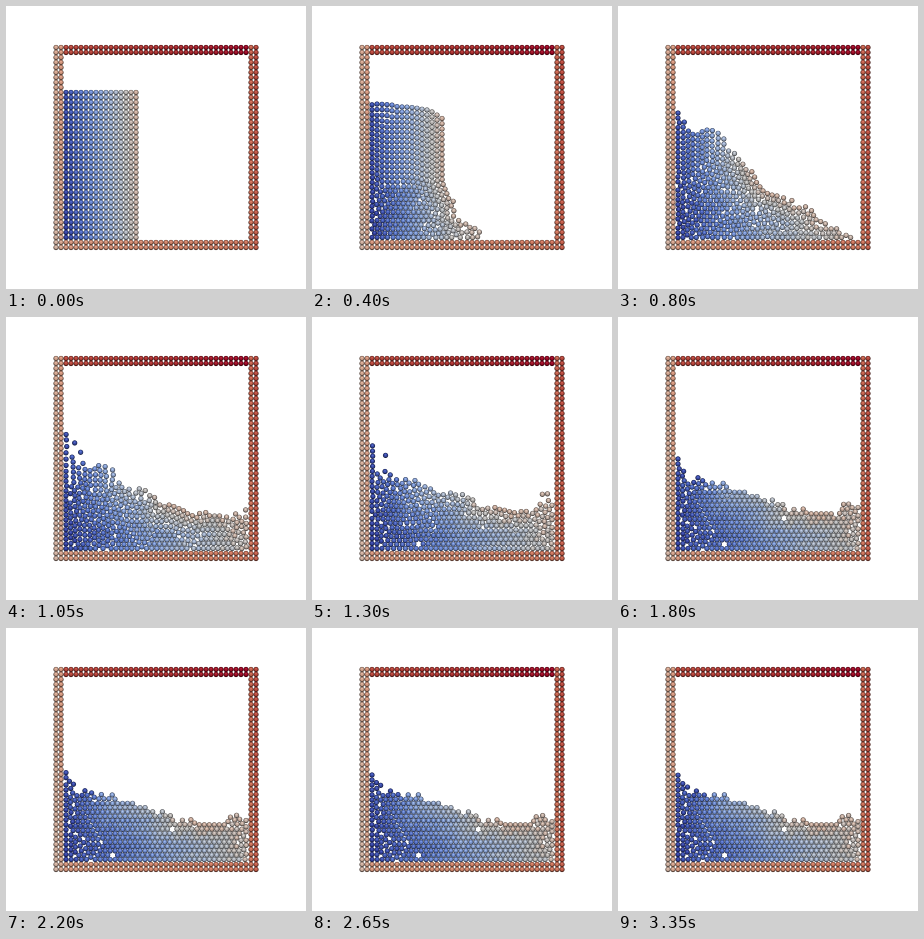
These frames come from a looping animation (300x283 px, 3400 ms). A matplotlib script:

```python
import numpy as np
import matplotlib.pyplot as plt
from matplotlib.animation import FuncAnimation
from matplotlib.collections import EllipseCollection

WIDTH, HEIGHT, DPI = 300, 283, 100
FRAMES, INTERVAL = 68, 50
D = 5.0
R = D / 2
SIDE = 41                       # spheres along one wall
X0, Y0 = 50.0, 41.5             # centre of the top left wall sphere
LEFT, RIGHT = X0 + 1.5 * D, X0 + (SIDE - 2.5) * D
FLOOR = Y0 + (SIDE - 2.5) * D
COLS, ROWS = 15, 30

# contact model, in pixels and frames
SUBSTEPS = 50
DT = 1 / SUBSTEPS
GRAVITY, STIFFNESS, DAMPING = 1.15, 300.0, 7.0
SHEAR, FRICTION = 3.0, 0.08


def block(cols, rows):
    """Centres of lattice cells, column by column, bottom to top."""
    return [(X0 + D * c, Y0 + D * r) for c in cols for r in reversed(rows)]


def heap_shift(x, frame):
    """Sideways drift towards a wedge that flattens as its reach grows."""
    reach = max(COLS * D, 360 * (1 - np.exp(-(frame / 20) ** 2)))
    grid = np.linspace(LEFT, RIGHT, 200)
    mass = np.cumsum(np.maximum(0, 1 - (grid - LEFT) / reach))
    q = np.linspace(0.01, 0.985, 24)
    have = np.quantile(x, q)
    want = np.interp(q, mass / mass[-1], grid)
    return np.interp(x, have, want - have)


def near_pairs(pos):
    gap = pos[:, None] - pos
    return np.nonzero(np.triu((gap ** 2).sum(axis=2) < (D + 3) ** 2, 1))


def accelerations(pos, vel, first, second):
    acc = np.zeros_like(pos)
    acc[:, 1] = GRAVITY

    rel = pos[first] - pos[second]
    dist = np.hypot(rel[:, 0], rel[:, 1])
    touch = dist < D
    a, b = first[touch], second[touch]
    dist = np.maximum(dist[touch], 1e-6)
    normal = rel[touch] / dist[:, None]
    dv = vel[a] - vel[b]
    vn = (dv * normal).sum(axis=1)
    push = np.maximum(STIFFNESS * (D - dist) - DAMPING * vn, 0)
    slip = dv - vn[:, None] * normal
    speed = np.hypot(slip[:, 0], slip[:, 1]) + 1e-9
    grip = np.minimum(SHEAR * speed, FRICTION * push) / speed
    force = push[:, None] * normal - grip[:, None] * slip
    for k in (0, 1):
        acc[:, k] += np.bincount(a, force[:, k], len(pos))
        acc[:, k] -= np.bincount(b, force[:, k], len(pos))

    for axis, sign, edge in ((0, 1, LEFT), (0, -1, RIGHT), (1, -1, FLOOR)):
        depth = R - sign * (pos[:, axis] - edge)
        push = STIFFNESS * depth - DAMPING * sign * vel[:, axis]
        push = np.where(depth > 0, np.maximum(push, 0), 0)
        acc[:, axis] += sign * push
        limit = FRICTION * push
        acc[:, 1 - axis] -= np.clip(SHEAR * vel[:, 1 - axis], -limit, limit)
    return acc


def simulate(start):
    """Collapse of the column; only the lowest rows start disturbed."""
    rng = np.random.default_rng(4)
    pos = start.copy()
    height = (FLOOR - pos[:, 1]) / D
    vel = rng.normal(0, 1.5, pos.shape) * np.exp(-height / 4)[:, None]
    track = [pos.copy()]
    for frame in range(1, FRAMES):
        drag = 0.03 + 6 * np.clip((frame - 14) / 40, 0, 1) ** 3
        rate = np.interp(frame, [10, 16, 36, 50], [0, 0.2, 0.2, 0])
        drift = rate * heap_shift(pos[:, 0], frame)
        for step in range(SUBSTEPS):
            if step % 10 == 0:
                first, second = near_pairs(pos)
            vel += DT * accelerations(pos, vel, first, second)
            vel *= 1 - drag * DT
            pos += DT * vel
            pos[:, 0] += DT * drift
        track.append(pos.copy())
    return track


grains = np.array(block(range(2, 2 + COLS), range(SIDE - 2 - ROWS, SIDE - 2)))
inner, full = range(2, SIDE - 2), range(SIDE)
near, far = range(2), range(SIDE - 2, SIDE)
walls = np.array(block(near, full) + block(inner, far)
                 + block(far, full) + block(inner, near))
track = simulate(grains)

fig = plt.figure(figsize=(WIDTH / DPI, HEIGHT / DPI), dpi=DPI, facecolor="white")
ax = fig.add_axes([0, 0, 1, 1])
ax.set_xlim(0, WIDTH)
ax.set_ylim(HEIGHT, 0)
ax.axis("off")

# colour runs with the sphere's index, grains first
rgb = plt.get_cmap("coolwarm")(np.linspace(0, 1, len(grains) + len(walls)))[:, :3]
# diameter, upward offset, colours: rim, body, highlight
SHADES = [
    (5.2, 0.0, rgb * 0.32),
    (4.0, 0.3, rgb * 0.78),
    (1.8, 0.7, rgb * 0.85 + 0.1),
]


def placed(frame, lift):
    return np.vstack([track[frame], walls]) - [0, lift]


layers = []
for size, lift, colors in SHADES:
    layer = EllipseCollection(
        [size], [size], [0], units="xy", offsets=placed(0, lift),
        offset_transform=ax.transData, facecolors=colors, linewidths=0)
    ax.add_collection(layer, autolim=False)
    layers.append((layer, lift))


def update(frame):
    for layer, lift in layers:
        layer.set_offsets(placed(frame, lift))
    return [layer for layer, _ in layers]


anim = FuncAnimation(fig, update, frames=FRAMES, interval=INTERVAL, repeat=True)
plt.show()
```
